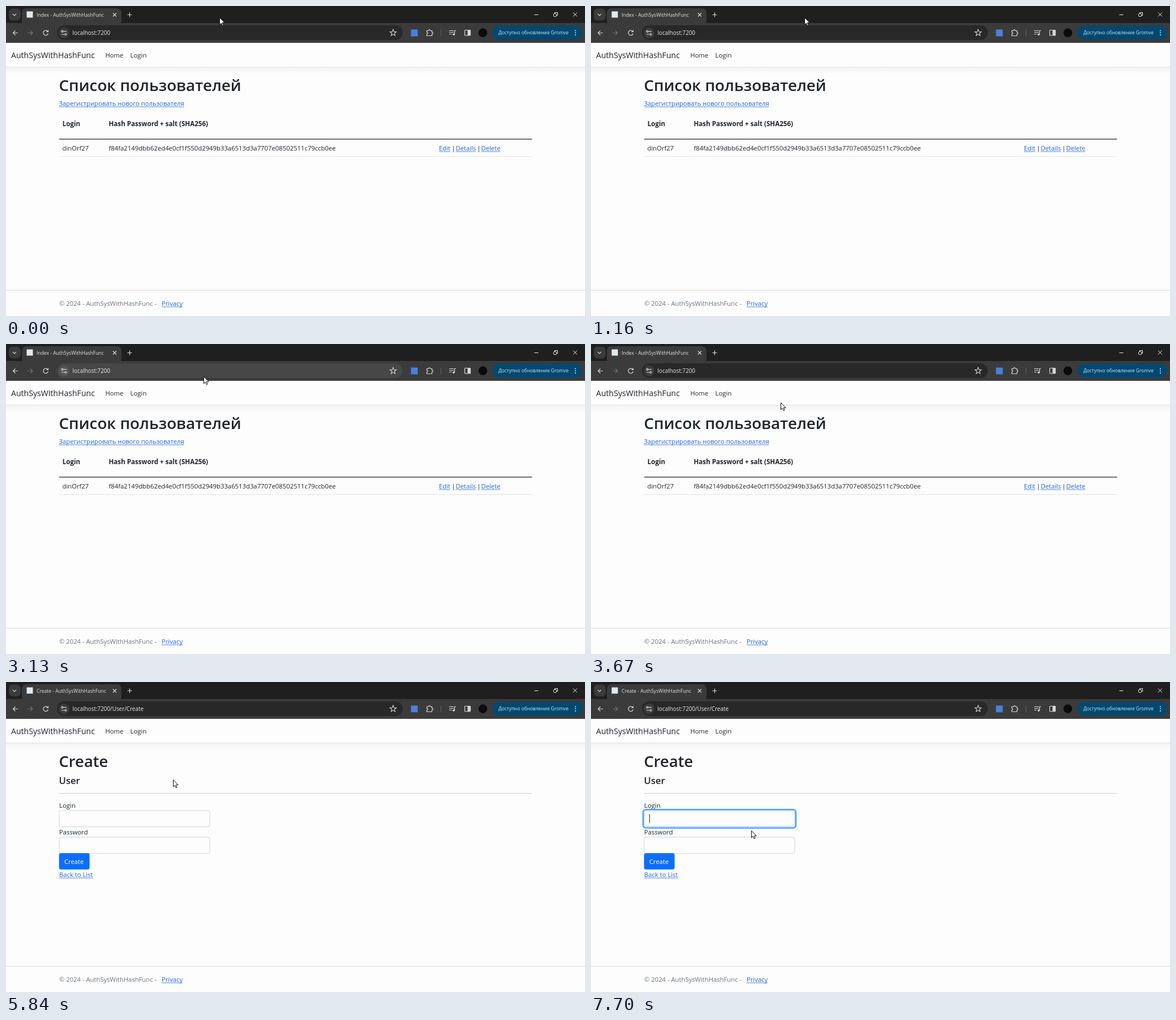
Write an HTML page with a canvas that moves like this. It is 1023 by 547 pixels and loops after 8 s.

```html
<!DOCTYPE html>
<html lang="ru">
<head>
<meta charset="utf-8">
<title>User list</title>
<style>
html, body { margin: 0; width: 100%; height: 100%; overflow: hidden; background: #fdfdfd; }
canvas { display: block; width: 100vw; height: 100vh; }
</style>
</head>
<body>
<canvas></canvas>
<script>
const W = 1023, H = 547, LOOP = 8000;
const PAGE_AT = 5740, FOCUS_AT = 6690, BLINK = 500;
const canvas = document.querySelector('canvas');
const ctx = canvas.getContext('2d');
const ratio = window.devicePixelRatio || 1;
canvas.width = Math.round(W * ratio);
canvas.height = Math.round(H * ratio);

const INK = '#212529', LINK = '#1f66e5', LINK_HOVER = '#0a58ca', PAPER = '#fdfdfd';
const ICON = '#d5d7da', BAR = '#3b3b3b', STRIP = '#1f1f20';
const FAMILY = '"Open Sans", "Noto Sans", sans-serif';
const BASE = 11.25;

// Pointer way points: time, x, y
const WAY = [
  [0, 377, 20], [2500, 377, 20], [3130, 349, 57], [3400, 342, 70],
  [4130, 322, 158], [4400, 319, 172], [4730, 295, 172], [5860, 295, 172],
  [6300, 253, 187], [6500, 266, 224], [6620, 272, 240], [6740, 272, 240],
  [6970, 283, 262], [LOOP, 283, 262]
];

const ARROW = new Path2D('M0 0V12.4L2.8 9.8L4.7 14.1L6.6 13.3L4.8 9.1H8.7Z');
const HAND = new Path2D('M-1.6 1.3Q-1.6 0 -.2 0Q1.2 0 1.2 1.3V6Q3.6 5.3 3.8 6.8Q6 6.1 6.2 7.6' +
  'Q8 7.1 8.2 9V12Q8 14 7 15V17H-.5V15.5L-4.6 10.5Q-5.4 9 -4 8.7Q-3 8.7 -1.6 10.5Z');
const STAR = new Path2D(starPath(684, 47.3, 6, 2.5));
const PUZZLE = new Path2D('M743.5 43.5H746.4A1.7 1.7 0 0 1 749.8 43.5H752.5V46.2' +
  'A1.7 1.7 0 0 1 752.5 49.6V52.5H743.5V49.6A1.7 1.7 0 0 0 743.5 46.2Z');

function starPath(x, y, outer, inner) {
  let path = '';
  for (let i = 0; i < 10; i++) {
    const r = i % 2 ? inner : outer, a = i * Math.PI / 5 - Math.PI / 2;
    path += (i ? 'L' : 'M') + (x + r * Math.cos(a)) + ' ' + (y + r * Math.sin(a));
  }
  return path + 'Z';
}

function text(str, x, y, size = BASE, color = INK, weight = 400) {
  ctx.font = `${weight} ${size}px ${FAMILY}`;
  ctx.fillStyle = color;
  ctx.fillText(str, x, y);
  return ctx.measureText(str).width;
}

function link(str, x, y, color = LINK) {
  rect(x, y + 1.5, text(str, x, y, BASE, color), 0.8, color);
}

function rect(x, y, w, h, color) {
  ctx.fillStyle = color;
  ctx.fillRect(x, y, w, h);
}

function round(x, y, w, h, r, color) {
  ctx.beginPath();
  ctx.roundRect(x, y, w, h, r);
  ctx.fillStyle = color;
  ctx.fill();
}

function frame(x, y, w, h, r, color, width = 1) {
  ctx.beginPath();
  ctx.roundRect(x, y, w, h, r);
  ctx.strokeStyle = color;
  ctx.lineWidth = width;
  ctx.stroke();
}

function disc(x, y, r, color) {
  ctx.beginPath();
  ctx.arc(x, y, r, 0, Math.PI * 2);
  ctx.fillStyle = color;
  ctx.fill();
}

function stroke(path, color = ICON, width = 1.2) {
  ctx.strokeStyle = color;
  ctx.lineWidth = width;
  ctx.stroke(path instanceof Path2D ? path : new Path2D(path));
}

function drawTabs(title) {
  rect(0, 0, W, 31, STRIP);
  round(5, 4.5, 21, 21, 7, BAR);
  stroke('M12 14L15 17L18 14');
  round(28, 4, 176, 30, 8, BAR);
  rect(36.5, 9.5, 11, 11, '#e2eaee');
  text(title, 54, 18.6, 8.55, '#e3e3e3');
  stroke('M189 12.5L195 18.5M195 12.5L189 18.5');
  stroke('M214.5 15.5H222.5M218.5 11.5V19.5');
  stroke('M933.5 15.5H940.5', '#eee', 1);
  frame(967.5, 13.5, 5, 5, 1, '#eee');
  stroke('M969.5 13.5V11.5H974.5V16.5H972.5', '#eee', 1);
  stroke('M1002 11.5L1009 18.5M1009 11.5L1002 18.5', '#eee', 1);
}

function drawToolbar(url, hovered) {
  rect(0, 30, W, 35.5, BAR);
  stroke('M21 47.5H12.5M16.5 43.5L12.5 47.5L16.5 51.5');
  stroke('M38.5 47.5H47M43 43.5L47 47.5L43 51.5', '#747474');
  stroke('M73.8 45A4.3 4.3 0 1 0 74.4 48.5M74.5 42.5V45.5H71.3');
  round(90, 34, 611, 26, 13, hovered ? '#474747' : '#282828');
  disc(102.5, 47.5, 9.5, hovered ? '#555' : '#3c3c3c');
  stroke('M101.5 44.8H107M98 50H103.5');
  ctx.beginPath();
  ctx.arc(99.5, 44.8, 1.5, 0, 7);
  ctx.moveTo(107, 50);
  ctx.arc(105.5, 50, 1.5, 0, 7);
  ctx.stroke();
  text(url, 117.5, 51, 9.9, '#e8e8e8');
  stroke(STAR, ICON, 1.1);
  rect(715.5, 41.5, 12, 12, '#4a80dc');
  stroke(PUZZLE);
  rect(768, 42, 1, 11, '#5e6266');
  stroke('M783 43.5H791M783 46.5H791M783 49.5H787.5M792.5 50V43.5H795');
  disc(791, 50.3, 1.8, ICON);
  frame(810.5, 42.5, 10, 9.5, 1, ICON, 1.2);
  rect(815.5, 42.5, 5, 9.5, ICON);
  disc(842.5, 47.3, 7.7, '#0b0b0b');
  round(859, 34.5, 159.5, 25, 12.5, '#04486f');
  text('Доступно обновление Gromve', 870, 50.4, 8.4, '#c9e8fb', 500);
  for (const y of [43.5, 47.3, 51.1]) disc(1006, y, 1.05, '#c9e8fb');
}

function drawShell() {
  rect(0, 65, W, H - 65, PAPER);
  const shade = ctx.createLinearGradient(0, 107, 0, 120);
  shade.addColorStop(0, 'rgba(0,0,0,.045)');
  shade.addColorStop(1, 'rgba(0,0,0,0)');
  rect(0, 107, W, 13, shade);
  rect(0, 107, W, 0.8, '#dfe1e4');
  text('AuthSysWithHashFunc', 9, 92.2, 14.1);
  text('Home', 175.5, 91);
  text('Login', 219.5, 91, 11.4);
  rect(0, 501, W, 1, '#d8dade');
  text('© 2024 - AuthSysWithHashFunc -', 94, 529, BASE, '#6c757d');
  link('Privacy', 275, 529);
}

function drawList(hovered) {
  text('Список пользователей', 93.5, 150.3, 27.8, INK, 600);
  link('Зарегистрировать нового пользователя', 93.5, 176, hovered ? LINK_HOVER : LINK);
  text('Login', 99.8, 212, 11.5, INK, 700);
  text('Hash Password + salt (SHA256)', 181.5, 212, 11.6, INK, 700);
  rect(94, 234.2, 835.5, 1.4, '#35383a');
  text('dinOrf27', 99.5, 255);
  text('f84fa2149dbb62ed4e0cf1f550d2949b33a6513d3a7707e08502511c79ccb0ee', 181.5, 255, 11.3);
  link('Edit', 765, 255);
  text('|', 787.5, 255);
  link('Details', 794.5, 255);
  text('|', 832.5, 255);
  link('Delete', 839.5, 255);
  rect(94, 265, 835.5, 0.9, '#dee2e6');
}

function drawField(y, focus) {
  if (focus) {
    ctx.globalAlpha = focus;
    round(91, y - 3, 272, 34.5, 6, '#258cfb');
    round(92.8, y - 1.2, 268.4, 30.9, 4.5, '#fff');
    ctx.globalAlpha = 1;
  }
  round(94, y, 266, 28.5, 3.5, PAPER);
  frame(94, y, 266, 28.5, 3.5, focus ? '#86b7fe' : '#ced4da');
}

function drawForm(t) {
  text('Create', 93.5, 150.3, 27.4, INK, 600);
  text('User', 93.5, 180, 16.7, INK, 600);
  rect(94, 196, 835.5, 0.9, '#c9cacd');
  text('Login', 94, 222, 11.4);
  text('Password', 94, 269);
  const focus = Math.min(1, Math.max(0, (t - FOCUS_AT) / 150));
  drawField(227, focus);
  drawField(273.8, 0);
  if (focus && Math.floor((t - FOCUS_AT - 10) / BLINK) % 2 === 0) rect(103, 233, 1, 15.5, INK);
  round(93.7, 302, 54, 28.7, 3.5, '#0d6efd');
  text('Create', 103, 320.7, BASE, '#fff');
  link('Back to List', 94, 344);
}

function pointerAt(t) {
  const i = Math.max(1, WAY.findIndex(p => p[0] > t));
  const [t0, x0, y0] = WAY[i - 1], [t1, x1, y1] = WAY[i];
  const k = (t - t0) / (t1 - t0);
  return [x0 + (x1 - x0) * k, y0 + (y1 - y0) * k];
}

function drawPointer(x, y, kind) {
  ctx.save();
  ctx.translate(Math.round(x) + 0.5, Math.round(y) + 0.5);
  if (kind === 'beam') {
    stroke('M-2.5 -6.5H2.5M0 -6.5V6.5M-2.5 6.5H2.5', '#111', 1);
  } else {
    const shape = kind === 'hand' ? HAND : ARROW;
    ctx.fillStyle = '#fff';
    ctx.fill(shape);
    stroke(shape, '#111', 1);
    if (kind === 'hand') stroke('M1.2 6V9M3.8 6.8V9.3M6.2 7.6V9.6', '#111', 0.8);
  }
  ctx.restore();
}

function draw(t) {
  const form = t >= PAGE_AT;
  const [x, y] = pointerAt(t);
  const overBar = y >= 34 && y <= 60 && x > 90 && x < 701;
  const overLink = !form && x < 313 && y > 165 && y < 181;
  const overField = form && x > 94 && x < 360 && y > 227 && y < 255;

  ctx.setTransform(ratio, 0, 0, ratio, 0, 0);
  drawTabs((form ? 'Create' : 'Index') + ' - AuthSysWithHashFunc');
  drawToolbar('localhost:7200' + (form ? '/User/Create' : ''), overBar);
  drawShell();
  if (form) drawForm(t);
  else drawList(overLink);
  drawPointer(x, y, overLink ? 'hand' : overField ? 'beam' : 'arrow');
}

const start = performance.now();
function tick() {
  draw((performance.now() - start) % LOOP);
  requestAnimationFrame(tick);
}
tick();
</script>
</body>
</html>
```
